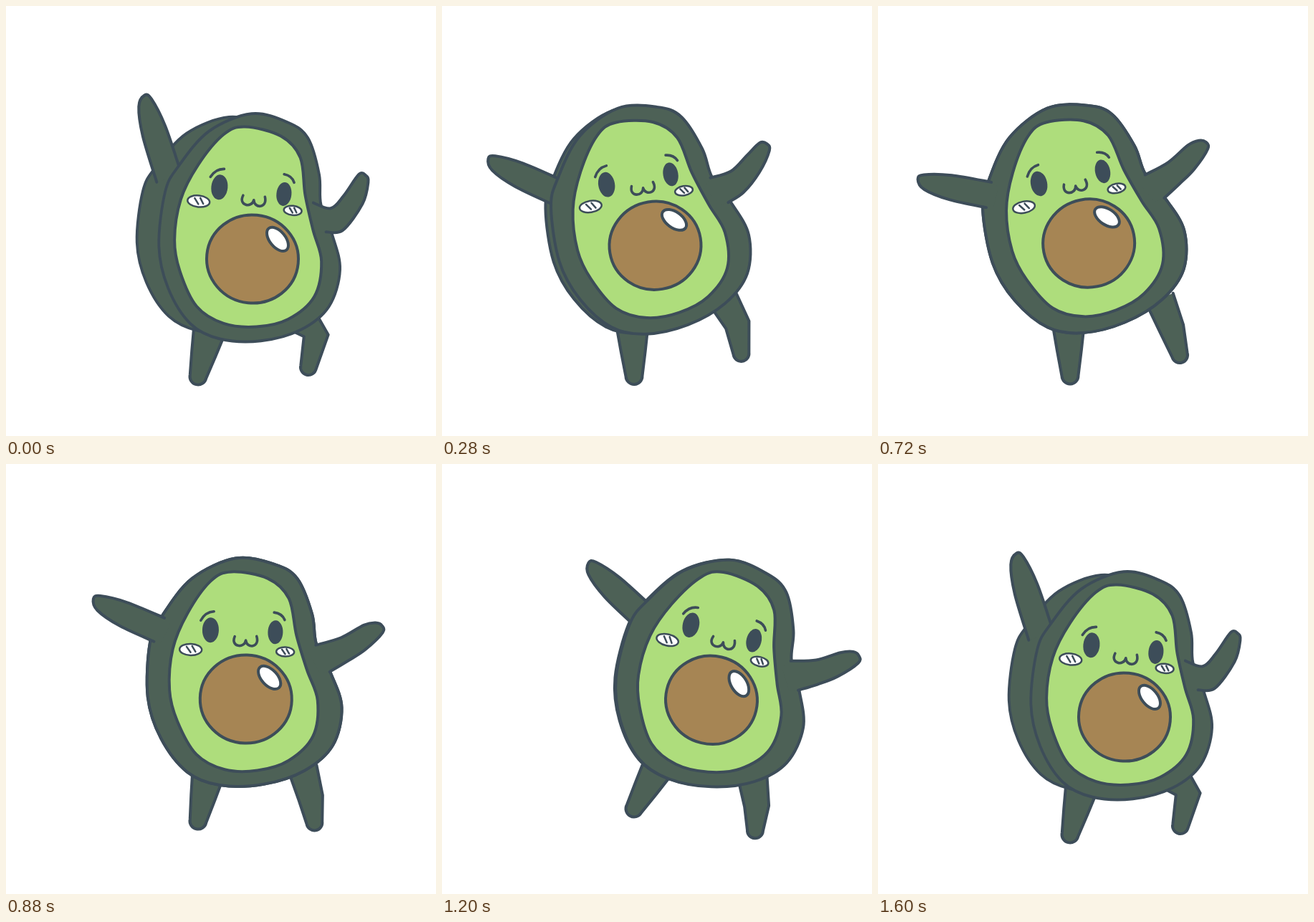
Write an HTML page with a canvas that moves like this. It is 600 px wide and 600 px high and loops after 1640 ms.

```html
<!DOCTYPE html>
<html>
<head>
<meta charset="utf-8">
<style>
  html, body { margin: 0; height: 100%; overflow: hidden; background: #fff; }
  canvas { display: block; width: 600px; height: 600px; }
</style>
</head>
<body>
<canvas id="stage" width="600" height="600"></canvas>
<script>
const ctx = document.getElementById('stage').getContext('2d');
const LOOP = 1640;
const LINE = '#3d4d59', RIND = '#4d6156', FLESH = '#aedd7c', SEED = '#a68554';

// time, seed x, seed y, tilt, turn, left arm angle, right arm angle, left foot y, right foot x, right foot y
const poses = [
  [0,    344, 353,   5.8, 1,   254, -42,   517, 422, 504],
  [160,  322, 342,  -1.3, .6,  229, -43,   517, 421, 495],
  [400,  280, 329, -15.3, 0,   190, -44.6, 516, 415, 478],
  [720,  294, 331, -11.3, 0,   193, -41,   516, 421, 487],
  [1000, 366, 326,  11.3, 0,   216, -19.5, 484, 437, 510],
  [1160, 377, 328,  13.5, 0,   223, -15.5, 480, 438, 512],
  [1400, 362, 338,  11.4, .39, 236, -28.8, 492, 429, 506],
  [1600, 344, 353,   5.8, 1,   254, -42,   517, 422, 505]
];

// Body outlines around the seed centre, upright
const rind = [-20,-196, 35,-189, 67,-170, 89,-121, 96,-80, 117,-40, 134,8, 123,61, 85,97,
  28,118, -33,121, -79,104, -117,58, -137,1, -136,-75, -120,-113, -80,-166];
const flesh = [-25,-177, 26,-169, 56,-142, 68,-91, 84,-43, 100,-1, 95,49, 62,84, 19,99,
  -27,99, -67,79, -95,33, -107,-10, -104,-67, -85,-117, -54,-163];

const rad = deg => deg * Math.PI / 180;
const mix = (a, b, k) => a + (b - a) * k;

function poseAt(time) {
  const last = poses.length - 1;
  if (time >= poses[last][0]) return poses[last];
  const i = poses.findIndex((p, n) => time < poses[n + 1][0]);
  const a = poses[i], b = poses[i + 1], span = b[0] - a[0], s = (time - a[0]) / span;
  const slope = (n, c) => n === 0 || n === last ? 0 :
    (poses[n + 1][c] - poses[n - 1][c]) / (poses[n + 1][0] - poses[n - 1][0]);
  return a.map((v, c) =>
    mix(v, b[c], s * s * (3 - 2 * s)) +
    span * s * (1 - s) * ((1 - s) * slope(i, c) - s * slope(i + 1, c)));
}

function smooth(flat, closed) {
  const n = flat.length / 2, path = new Path2D();
  const at = i => {
    i = closed ? (i + n) % n : Math.max(0, Math.min(n - 1, i));
    return [flat[2 * i], flat[2 * i + 1]];
  };
  path.moveTo(...at(0));
  for (let i = 0; i < (closed ? n : n - 1); i++) {
    const [p, q, r, s] = [at(i - 1), at(i), at(i + 1), at(i + 2)];
    path.bezierCurveTo(q[0] + (r[0] - p[0]) / 6, q[1] + (r[1] - p[1]) / 6,
      r[0] - (s[0] - q[0]) / 6, r[1] - (s[1] - q[1]) / 6, ...r);
  }
  return path;
}

const rindPath = smooth(rind, true), fleshPath = smooth(flesh, true);

function paint(path, fill, width = 4) {
  if (fill) { ctx.fillStyle = fill; ctx.fill(path); }
  if (width) { ctx.lineWidth = width; ctx.stroke(path); }
}

function oval(x, y, rx, ry, fill, width, angle = 0) {
  const path = new Path2D();
  path.ellipse(x, y, rx, ry, rad(angle), 0, 2 * Math.PI);
  paint(path, fill, width);
}

function placed(x, y, angle, sx, sy, draw) {
  ctx.save();
  ctx.translate(x, y);
  ctx.rotate(rad(angle));
  ctx.scale(sx, sy);
  draw();
  ctx.restore();
}

// The fill reaches into the body so that the outline opens where the arm joins
function arm(points, base) {
  const edge = smooth(points, false), area = new Path2D(edge);
  area.lineTo(base, points[points.length - 1] * .8);
  area.lineTo(base, points[1] * .8);
  area.closePath();
  paint(area, RIND, 0);
  paint(edge);
}

function leg(hip, knee, foot, hipSize, kneeSize, footSize) {
  const side = (p, from, to, size) => {
    const dx = to[0] - from[0], dy = to[1] - from[1], k = size / Math.hypot(dx, dy);
    return [p[0] - dy * k, p[1] + dx * k];
  };
  const path = new Path2D();
  path.moveTo(...side(hip, hip, knee, hipSize));
  path.lineTo(...side(knee, hip, foot, kneeSize));
  const angle = Math.atan2(foot[1] - knee[1], foot[0] - knee[0]);
  path.arc(...foot, footSize, angle + Math.PI / 2, angle - Math.PI / 2, true);
  path.lineTo(...side(knee, hip, foot, -kneeSize));
  path.lineTo(...side(hip, hip, knee, -hipSize));
  paint(path, RIND);
}

function cheek(x, y, rx, ry) {
  oval(x, y, rx, ry, '#fff', 2.5);
  const k = rx / 16;
  paint(new Path2D(`M${x - 6 * k} ${y - 4 * k}l${6 * k} ${8 * k}M${x + 2 * k} ${y - 5 * k}l${5 * k} ${8 * k}`), null, 2.5);
}

function face(turn) {
  const lift = -5.5 * turn;
  cheek(-79, -67 + lift, 15.5, 8);
  cheek(53, -67.5 + lift, 12.5, 6.5);
  oval(-52, -95, 11.5, 17.5, LINE, 0);
  oval(38.5, -94.5, 10.5, 16.5, LINE, 0);
  paint(new Path2D('M-66-108Q-60-120-48-121M36-122Q47-121 51-112'), null, 3.6);
  paint(new Path2D('M-18-87C-24-72-4-70-2.5-82C-1-70 18-72 12.5-88'), null, 3.6);
}

function draw(time) {
  const [, x, y, tilt, rawTurn, leftAngle, rightAngle, leftFootY, footX, footY] = poseAt(time);
  const turn = Math.max(0, Math.min(1, rawTurn)), bend = turn * (1.7 - .7 * turn);
  const c = Math.cos(rad(tilt)), s = Math.sin(rad(tilt));
  const toStage = (px, py) => [x + px * c - py * s, y + px * s + py * c];
  const between = (a, b, dx = 0, dy = 0) => [(a[0] + b[0]) / 2 + dx, (a[1] + b[1]) / 2 + dy];

  ctx.fillStyle = '#fff';
  ctx.fillRect(0, 0, 600, 600);
  ctx.strokeStyle = LINE;
  ctx.lineCap = ctx.lineJoin = 'round';

  const leftHip = toStage(-50, 106), leftFoot = [268, leftFootY];
  leg(leftHip, between(leftHip, leftFoot), leftFoot, 22, 17, 11.5);
  const rightHip = toStage(82, 95 - 14 * turn), rightFoot = [footX, footY];
  leg(rightHip, between(rightHip, rightFoot, 3 + 10 * bend, 3 - 16 * bend), rightFoot, 20, 17, 11);

  const shiftX = -4 * turn, shiftY = -5.5 * turn, squeeze = 1 - .06 * turn;
  const leftArm = () => placed(-125 - 7 * turn, -94 - 18 * turn, leftAngle - tilt, 1 + .08 * turn, 1, () =>
    arm([-1, 18, 55, 15, 93, 7, 100, -1, 88, -13, 50, -19, -2 - 10 * turn, -18], -12));

  placed(x, y, tilt, 1, 1, () => {
    placed(-34 * turn, shiftY - 2 * turn, 0, squeeze, 1 - .05 * turn, () => paint(rindPath, RIND));
    const armBehind = turn > .04;
    if (armBehind) leftArm();
    placed(-3 * turn, shiftY, 0, squeeze, 1, () => paint(rindPath, RIND));
    if (!armBehind) leftArm();

    placed(106 - 18 * turn, -60 - 8 * turn, rightAngle - tilt, 1, 1, () => {
      const m = (a, b) => mix(a, b, bend), reach = 94 - 8 * turn;
      arm([m(0, 6), -21, m(36, 19), m(-13, 1), m(72, 44), m(-13, 0), reach - 6, -8, reach, 0,
        reach - 4, 9, m(57, 56), m(18, 26), m(28, 11), m(20, 35), m(-1, -8), 21], -14);
    });

    placed(shiftX, shiftY, 0, 1, 1, () => paint(fleshPath, FLESH));
    placed(shiftX, 0, 0, 1, 1, () => face(turn));
    oval(0, 0, 64, 61.5, SEED, 4);
    oval(32, -31, 19.5, 11, '#fff', 4, 45);
  });
}

function tick(now) {
  draw(now % LOOP);
  requestAnimationFrame(tick);
}
draw(0);
requestAnimationFrame(tick);
</script>
</body>
</html>
```
